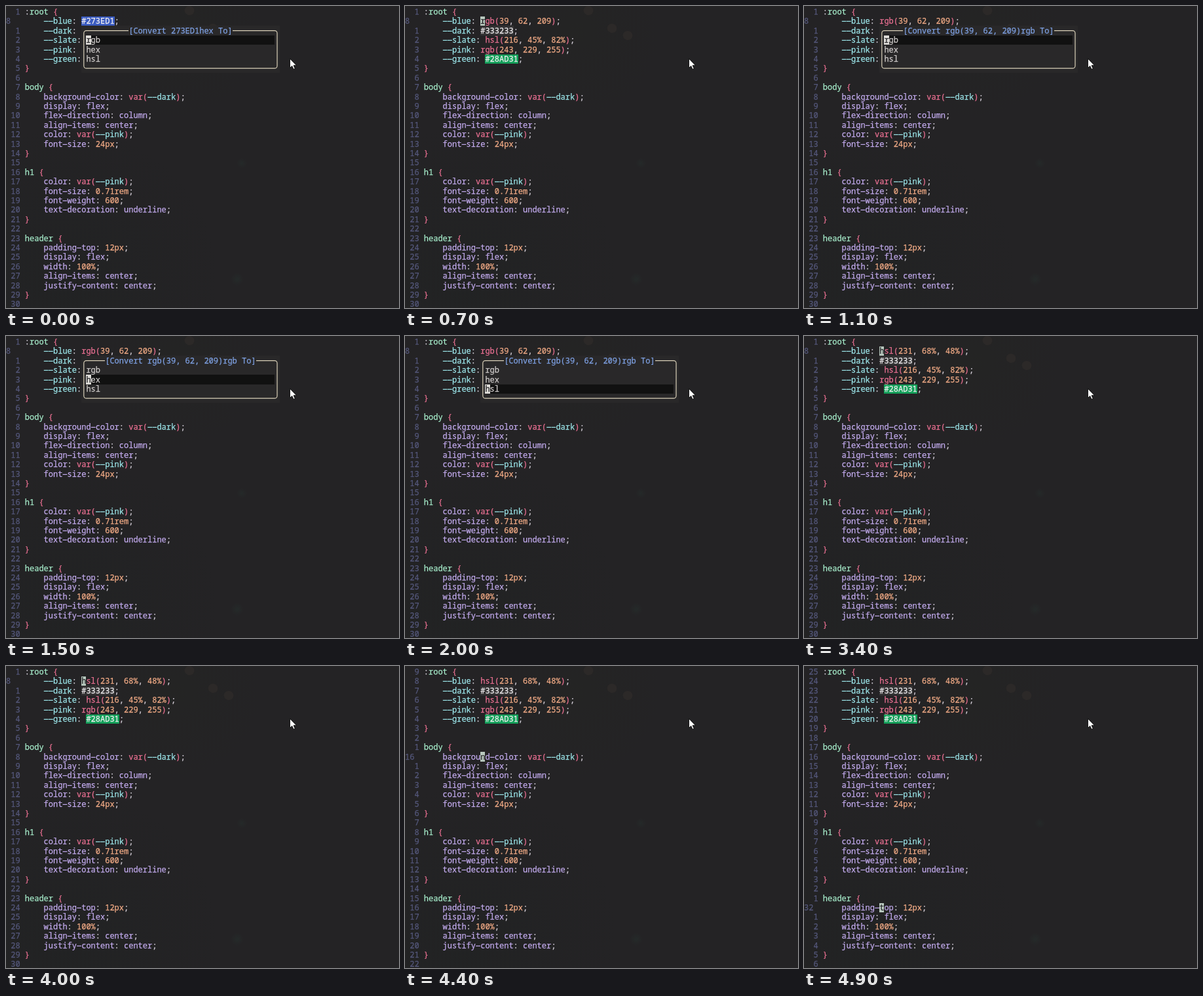
Write an HTML page with a canvas that moves like this. It is 600 px wide and 461 px high and loops after 5000 ms.

```html
<!DOCTYPE html>
<html lang="en">
<head>
<meta charset="utf-8">
<title>CSS colour converter</title>
<style>
html, body { margin: 0; width: 100%; height: 100%; overflow: hidden; background: #242325; }
canvas { display: block; }
</style>
</head>
<body>
<canvas id="stage" width="600" height="461"></canvas>
<script>
const ctx = document.getElementById('stage').getContext('2d');
const CW = 7.2, CH = 14.4, TOP = 1.6, TEXT_COL = 4, CURSOR_COL = 12;
const LOOP = 5000;

const ink = {
  number: '#55587c', selector: '#a6ecca', variable: '#9ce6ea', word: '#c3abee',
  value: '#f2ab86', call: '#ea7092', plain: '#d6d0da', title: '#7ea0e2',
  border: '#d9d0b8', item: '#d0cccb', hex: '#f2f0f2'
};
const swatch = { '#273ED1': '#3a5bc0', '#28AD31': '#14a05a', '#333233': '#333233' };

const css = blue => `:root {
    --blue: ${blue};
    --dark: #333233;
    --slate: hsl(216, 45%, 82%);
    --pink: rgb(243, 229, 255);
    --green: #28AD31;
}

body {
    background-color: var(--dark);
    display: flex;
    flex-direction: column;
    align-items: center;
    color: var(--pink);
    font-size: 24px;
}

h1 {
    color: var(--pink);
    font-size: 0.71rem;
    font-weight: 600;
    text-decoration: underline;
}

header {
    padding-top: 12px;
    display: flex;
    width: 100%;
    align-items: center;
    justify-content: center;
}
`.split('\n');

const HEX = '#273ED1', RGB = 'rgb(39, 62, 209)', HSL = 'hsl(231, 68%, 48%)';
const token = /(--\w+)|(#\w+)|([\d.]+(?:px|rem|%)?)|(var|rgb|hsl|[(){}])|([\w-]+)|\S/g;
const kinds = ['variable', 'hex', 'value', 'call', 'word'];

// Each entry holds from its time until the next one.
const scenes = [
  { at: 0, blue: HEX, title: '[Convert 273ED1hex To]', pick: 0 },
  { at: 400, blue: RGB },
  { at: 1000, blue: RGB, title: `[Convert ${RGB}rgb To]`, pick: 0 },
  { at: 1300, blue: RGB, title: `[Convert ${RGB}rgb To]`, pick: 1 },
  { at: 1800, blue: RGB, title: `[Convert ${RGB}rgb To]`, pick: 2 },
  { at: 2300, blue: HSL }
];

const rowY = row => TOP + row * CH;

function cells(col, row, count, color, rows = 1) {
  ctx.fillStyle = color;
  const x = Math.round(col * CW), y = Math.round(rowY(row));
  ctx.fillRect(x, y, Math.round((col + count) * CW) - x, Math.round(rowY(row + rows)) - y);
}

function write(text, col, row, color) {
  ctx.fillStyle = ctx.strokeStyle = color;
  ctx.lineWidth = 0.25;
  const base = Math.round(rowY(row) + 11.45);
  [...text].forEach((ch, i) => {
    const x = (col + i) * CW;
    if (ch === '-') ctx.fillRect(x + 0.2, base - 4.2, CW - 0.4, 1.2);
    else if (ch !== ' ') {
      ctx.fillText(ch, x, base);
      ctx.strokeText(ch, x, base);
    }
  });
}

function block(ch, col, row, color) {
  cells(col, row, 1, color);
  write(ch, col, row, '#232326');
}

function glow(x, y, r, color) {
  const g = ctx.createRadialGradient(x, y, 0, x, y, r);
  g.addColorStop(0, `rgba(${color})`);
  g.addColorStop(1, `rgba(${color.replace(/[^,]+$/, '0')})`);
  ctx.fillStyle = g;
  ctx.fillRect(x - r, y - r, 2 * r, 2 * r);
}

function backdrop() {
  ctx.fillStyle = '#242325';
  ctx.fillRect(0, 0, 600, 461);
  glow(260, 40, 130, '36,38,34,.4');
  glow(90, 420, 240, '30,34,33,.4');
  glow(353, 417, 10, '38,52,48,.4');
  glow(360, 240, 8, '38,50,47,.4');
  ctx.fillStyle = '#2c2928';
  for (const [x, y] of [[280, 7], [316, 34], [340, 45]]) {
    ctx.beginPath();
    ctx.ellipse(x, y, 7.5, 7, 0.3, 0, 7);
    ctx.fill();
  }
}

function codeLine(line, row) {
  for (const m of line.matchAll(token)) {
    let kind = kinds[m.slice(1).findIndex(Boolean)] || 'plain';
    if (kind === 'word' && line[0] !== ' ') kind = 'selector';
    const col = TEXT_COL + m.index;
    if (kind === 'hex') cells(col, row, m[0].length, swatch[m[0]]);
    write(m[0], col, row, ink[kind]);
  }
}

function popup({ title, pick }) {
  cells(16, 2, 42, '#292829', 5);
  const x = 16.5 * CW, y = rowY(2.5), w = 41 * CW, h = 4 * CH;
  ctx.strokeStyle = ink.border;
  ctx.lineWidth = 1.2;
  ctx.beginPath();
  ctx.roundRect(x, y, w, h, 4);
  ctx.stroke();
  const start = 17 + (40 - title.length) / 2;
  cells(start, 2, title.length, '#292829');
  write(title, start, 2, ink.title);
  cells(17, 3 + pick, 40, '#111111');
  ['rgb', 'hex', 'hsl'].forEach((name, i) => {
    write(name, 17, 3 + i, ink.item);
    if (i === pick) block(name[0], 17, 3 + i, '#dedcd8');
  });
}

function pointer() {
  const p = new Path2D('M433.5 80.5v14l3.2-3 2.3 5 2.2-1-2.2-4.8h4.4z');
  ctx.fillStyle = '#fff';
  ctx.strokeStyle = '#000';
  ctx.lineWidth = 0.8;
  ctx.fill(p);
  ctx.stroke(p);
}

function draw(now) {
  const t = now % LOOP;
  const scene = scenes.findLast(s => t >= s.at);
  const lines = css(scene.blue);
  const steps = Math.min(6, Math.max(0, Math.floor(t / 100) - 42));
  const current = 1 + 4 * steps;

  ctx.font = '12px "Noto Sans Mono", "DejaVu Sans Mono", monospace';
  backdrop();
  lines.forEach((line, row) => {
    const here = row === current;
    const label = String(here ? row + 7 : Math.abs(row - current));
    write(here ? label : label.padStart(3), 0, row, ink.number);
    codeLine(line, row);
  });
  if (scene.title) popup(scene);
  else {
    const line = lines[current];
    const col = Math.max(0, Math.min(CURSOR_COL, line.length - 1));
    block(line[col] || ' ', TEXT_COL + col, current, '#b9c9bf');
  }
  pointer();
}

function tick() {
  draw(performance.now());
  requestAnimationFrame(tick);
}
tick();
</script>
</body>
</html>
```
